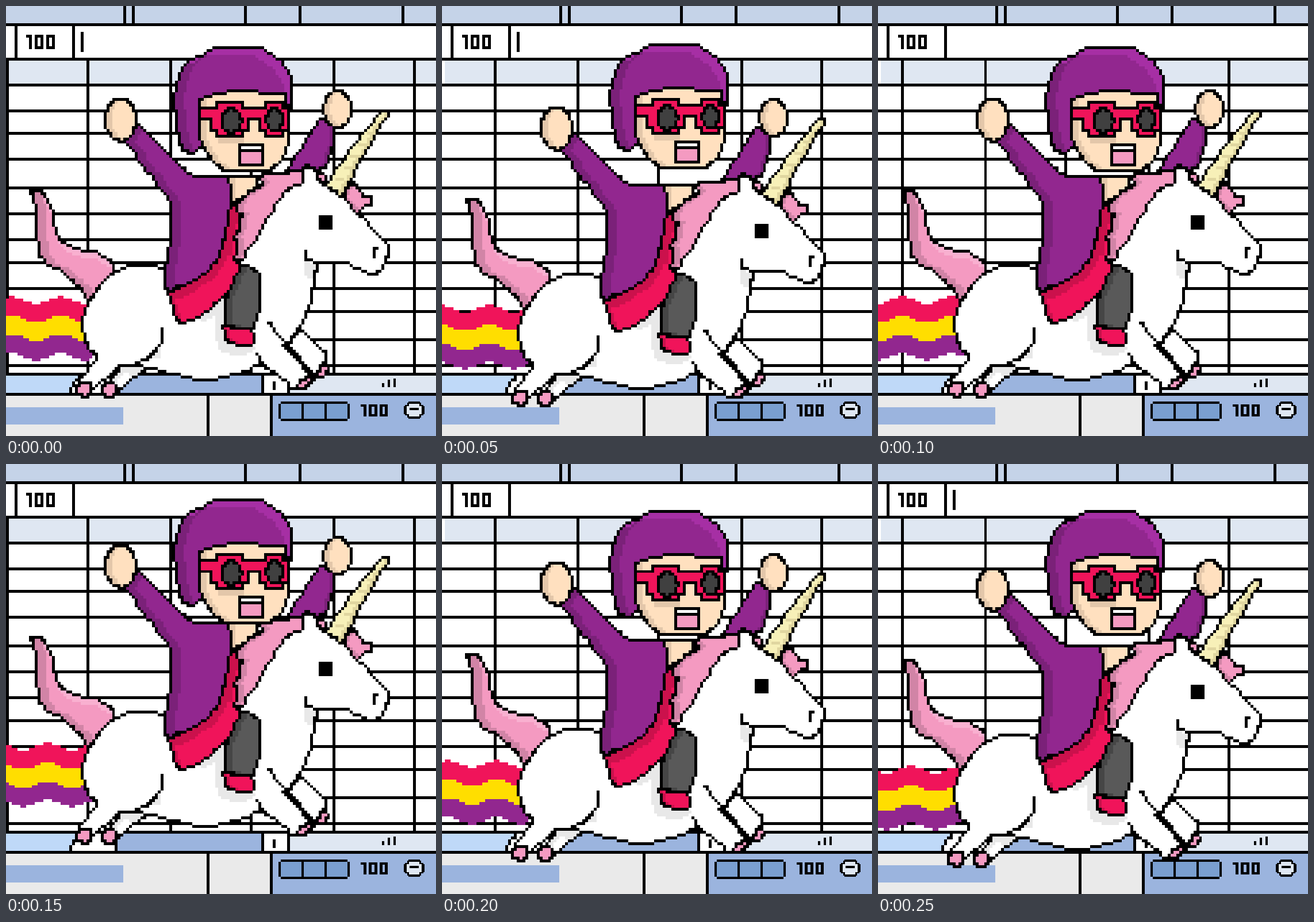
Recreate the animation shown at these times as an HTML page with a canvas. Size 748 by 748 pixels, loop 0.3 s.

```html
<!DOCTYPE html>
<html lang="en">
<head>
<meta charset="utf-8">
<title>Spreadsheet unicorn ride</title>
<style>
html, body { margin: 0; width: 100%; height: 100%; overflow: hidden; background: #fff; }
canvas { display: block; width: 100vw; height: 100vh; image-rendering: pixelated; }
</style>
</head>
<body>
<canvas id="stage" width="748" height="748"></canvas>
<script>
const SIZE = 748, N = 150, CELL = SIZE / N;
const BLACK = '#000', WHITE = '#fff', GREY = '#e8e8e8', COAL = '#404040';
const PURPLE = '#92278f', PLUM = '#7b2179', ORCHID = '#a62fa4';
const RED = '#f0145a', CRIMSON = '#cb114c', YELLOW = '#ffde00';
const PINK = '#f49ac1', ROSE = '#d184a6', BLUSH = '#f9b0d0';
const SKIN = '#ffe0bf', TAN = '#e3c7aa', CREAM = '#f7f0b8', SAND = '#e0d6a0';
const BLUE = '#9bb4de', PALE = '#dfe7f2', ICE = '#bfd9f8', SKY = '#c5d3e8', STEEL = '#7a9fd0';

function layer(size = N) {
  const c = document.createElement('canvas');
  c.width = c.height = size;
  return c.getContext('2d');
}

function box(g, x, y, w, h, color = BLACK) {
  g.fillStyle = color;
  g.fillRect(Math.round(x), Math.round(y), Math.round(w), Math.round(h));
}

// "x,y x,y | x,y ...": each run is smooth, "|" marks a corner
function curve(s) {
  const out = [];
  let last;
  for (const run of s.split(' | ')) {
    const p = run.split(' ').map(q => q.split(',').map(Number));
    if (last) p.unshift(last);
    for (let i = 0; i + 1 < p.length; i++) {
      const a = p[i - 1] || p[i], b = p[i], c = p[i + 1], d = p[i + 2] || c;
      for (let t = 0; t < 1; t += 0.125)
        out.push([0, 1].map(k => b[k] + t / 2 * (c[k] - a[k]
          + t * (2 * a[k] - 5 * b[k] + 4 * c[k] - d[k] + t * (3 * (b[k] - c[k]) + d[k] - a[k])))));
    }
    last = p[p.length - 1];
  }
  out.push(last);
  return out.map(p => p.map(v => Math.floor(v / CELL)));
}

function fillCells(pts) {
  const set = new Set();
  for (let y = 0; y < N; y++) {
    const xs = [];
    pts.forEach(([x1, y1], i) => {
      const [x2, y2] = pts[(i + 1) % pts.length];
      if ((y1 <= y) !== (y2 <= y)) xs.push(x1 + (y - y1) * (x2 - x1) / (y2 - y1));
    });
    xs.sort((a, b) => a - b);
    for (let i = 0; i + 1 < xs.length; i += 2)
      for (let x = Math.ceil(xs[i]); x <= xs[i + 1]; x++) set.add(y * N + x);
  }
  return set;
}

function paint(g, set, color) {
  for (const k of set) box(g, k % N, Math.floor(k / N), 1, 1, color);
}

function stroke(g, pts) {
  for (let i = 1; i < pts.length; i++) {
    const [x1, y1] = pts[i - 1], [x2, y2] = pts[i];
    const n = Math.max(Math.abs(x2 - x1), Math.abs(y2 - y1), 1);
    for (let k = 0; k <= n; k++) box(g, x1 + (x2 - x1) * k / n, y1 + (y2 - y1) * k / n, 1, 1);
  }
}

const line = (g, s) => stroke(g, curve(s));
const patch = (g, s, color) => paint(g, fillCells(curve(s)), color);

// Outlined shape; a shade [color, dx, dy] covers the rim facing (dx, dy)
function shape(g, s, fill, ...shades) {
  const pts = curve(s), base = fillCells(pts);
  paint(g, base, fill);
  for (const [color, dx, dy] of shades)
    paint(g, [...base].filter(k => !base.has(k + dx + dy * N)), color);
  stroke(g, [...pts, pts[0]]);
}

const oval = (cx, cy, rx, ry) => Array.from({ length: 9 }, (_, i) =>
  [cx + rx * Math.cos(i * Math.PI / 4), cy + ry * Math.sin(i * Math.PI / 4)].join()).join(' ');

// Box with corners cut by c
function plate(g, x, y, w, h, c, color) {
  box(g, x + c, y, w - 2 * c, h, color);
  box(g, x, y + c, w, h - 2 * c, color);
}

function hundred(g, x, y, u, v) {
  box(g, x, y, 2 * u, v);
  box(g, x + u, y, u, 5 * v);
  for (const col of [3, 7]) {
    for (const dy of [0, 4]) box(g, x + col * u, y + dy * v, 3 * u, v);
    for (const dx of [0, 2]) box(g, x + (col + dx) * u, y, u, 5 * v);
  }
}

function drawSheet() {
  const g = layer();
  box(g, 0, 0, N, N, WHITE);
  box(g, 0, 0, N, 6, SKY);
  for (const x of [41, 44, 83, 102, 138]) box(g, x, 0, 1, 6);
  for (const x of [3, 23]) box(g, x, 6, 1, 12);
  box(g, 1, 19, N, 8, PALE);

  // tabs, scroll bar, status bar
  box(g, 0, 129, 37, 6, ICE);
  box(g, 37, 129, 52, 6, BLUE);
  box(g, 99, 129, 51, 6, PALE);
  shape(g, '108,674 | 130,642 | 180,642 | 195,674', WHITE);
  for (const x of [89, 98]) box(g, x, 128, 1, 8);
  box(g, 93, 131, 1, 3);
  box(g, 0, 136, 92, 14, '#eaeaea');
  box(g, 93, 136, 57, 14, BLUE);
  box(g, 0, 140, 41, 6, BLUE);
  for (const x of [70, 92]) box(g, x, 136, 1, 14);
  for (const y of [6, 18, 27, 36, 44, 53, 63, 72, 81, 89, 98, 106, 116, 125, 128, 135])
    box(g, 0, y, N, 1);

  // finer icons and digits
  const big = layer(SIZE);
  big.imageSmoothingEnabled = false;
  big.drawImage(g.canvas, 0, 0, SIZE, SIZE);
  hundred(big, 35, 50, CELL, CELL);
  hundred(big, 617, 693, 4.7, 4.2);
  [7, 13, 15].forEach((h, i) => box(big, 654 + 10 * i, 663 - h, 4, h));
  plate(big, 474, 688, 124, 34, 4, BLACK);
  for (let i = 0; i < 3; i++) box(big, 478 + 40 * i, 692, 36, 26, STEEL);
  plate(big, 692, 688, 36, 30, 8, BLACK);
  plate(big, 694, 690, 32, 26, 4, BLACK);
  plate(big, 697, 692, 26, 22, 4, PALE);
  box(big, 702, 699, 16, 4);
  return big.canvas;
}

function drawMount() {
  const g = layer();
  shape(g, '42,320 60,323 80,355 88,398 115,420 160,430 187,448 | 187,462 165,490 142,516 | 128,490 100,465 62,438 54,400 52,352 42,320', PINK,
    [BLUSH, 0, -3], [ROSE, -4, 0]);
  // far arm and legs
  shape(g, '548,196 | 572,212 | 570,237 557,280 | 540,288 | 488,288 | 518,240', PURPLE, [PLUM, 2, 0]);
  shape(g, oval(577, 180, 25, 32), SKIN, [TAN, -3, 0]);
  shape(g, '490,590 | 512,562 | 555,603 | 557,622 | 540,645 | 533,643', WHITE);
  shape(g, '250,625 | 197,668 | 172,658 | 212,620', WHITE, [GREY, 0, -4]);
  // body, neck, head and near legs
  shape(g, '143,517 160,490 187,464 232,449 278,456 | 340,470 | 405,446 | 435,406 456,365 490,320 514,308 | 513,298 518,281 527,279 539,287 540,300 | 585,331 | 664,416 | 664,432 655,456 636,466 594,447 | 540,447 | 537,472 525,526 507,562 490,590 | 533,643 | 506,668 | 442,622 | 400,641 340,650 290,640 235,626 | 207,625 185,638 150,666 | 125,655 | 159,611 | 140,588 133,552 143,517', WHITE);
  patch(g, '520,445 | 537,452 | 530,475 | 517,470', GREY);
  patch(g, '340,530 | 385,500 | 385,585 | 432,595 | 410,613 | 370,600 | 366,540 | 342,550', GREY);
  patch(g, '268,592 | 268,612 | 235,620', GREY);
  line(g, '522,425 | 522,440 | 540,447');
  line(g, '272,560 268,590 247,612 228,621');
  for (const g0 of ['457,550 | 487,590 | 530,640', '483,590 | 525,640', '437,605 | 455,633']) line(g, g0);
  // hooves
  for (const [x, y] of [[136, 667], [181, 668]]) shape(g, oval(x, y, 14, 12), PINK);
  shape(g, '505,664 | 513,652 | 526,645 | 534,650 | 515,668', PINK);
  shape(g, '540,644 | 546,628 | 555,622 | 561,632 | 550,647', PINK);
  // eye and nostril
  box(g, 109, 73, 5, 5);
  line(g, '645,420 | 641,427 | 641,437');
  // forelock and horn
  shape(g, '540,285 | 558,298 | 552,312 | 542,302', PINK);
  shape(g, '588,332 | 603,305 | 620,329 | 637,331 | 637,345 | 622,350 | 612,360', PINK, [ROSE, -2, 0]);
  shape(g, '656,180 | 667,180 | 667,186 | 627,250 | 584,331 | 555,311 | 600,248', CREAM, [SAND, 2, 0]);
  for (let k = 0; k < 5; k++) box(g, 115 + 2.7 * k, 60 - 4 * k, 3, 1, SAND);

  // rider
  shape(g, '388,297 | 437,297 | 437,312 | 410,335 | 390,345', SKIN, [TAN, -2, 0]);
  shape(g, '390,338 | 411,365 | 402,420 | 399,442 | 418,456 | 400,482 342,535 312,550 | 296,548 | 283,498 | 350,460 | 375,420', RED,
    [CRIMSON, -3, -3]);
  shape(g, '326,297 | 388,297 | 391,340 383,385 373,428 350,460 285,495 | 279,490 | 279,450 284,420 287,340 | 240,280 | 209,236 | 229,203 | 275,250 303,278 326,297', PURPLE,
    [PLUM, -4, 0]);
  shape(g, oval(200, 198, 28, 37), SKIN, [TAN, -3, 0]);
  shape(g, '437,297 460,292 514,288 | 514,308 490,320 456,365 435,406 405,446 | 398,438 403,420 398,402 408,386 | 404,375 | 411,365 | 401,352 410,335 | 437,317 | 445,309', PINK,
    [ROSE, -3, 0]);
  shape(g, '412,450 | 430,457 442,472 442,520 428,562 | 382,556 | 380,525 390,490 412,450', '#595959', ['#464646', -3, 0]);
  shape(g, '378,556 400,561 420,562 433,574 430,588 410,590 385,582 378,556', RED, [CRIMSON, -2, 0]);
  return g.canvas;
}

function drawHead() {
  const g = layer();
  shape(g, '360,73 437,73 480,97 497,130 | 497,175 | 488,172 | 345,240 | 330,254 316,254 303,241 297,200 294,150 312,103 360,73', PURPLE,
    [PLUM, -4, 0], [ORCHID, 3, -3]);
  shape(g, '338,162 365,153 400,148 430,148 452,153 | 488,153 | 488,248 463,283 | 455,287 | 380,287 | 356,264 338,232', SKIN,
    [TAN, -3, 0]);
  box(g, 74, 45, 9, 3, TAN);
  // glasses
  plate(g, 68, 35, 31, 5, 0, BLACK);
  for (const [x, w] of [[71, 14], [88, 11]]) {
    plate(g, x, 33, w, 13, 2, BLACK);
    plate(g, x + 1, 34, w - 2, 11, 2, RED);
  }
  box(g, 68, 36, 30, 3, RED);
  shape(g, oval(392, 200, 18, 21), COAL);
  shape(g, oval(467, 198, 14, 20), COAL);
  // mouth
  box(g, 81, 48, 9, 8);
  box(g, 82, 49, 7, 1, WHITE);
  box(g, 82, 51, 7, 4, PINK);
  return g.canvas;
}

// Bounce and wave position per 50 ms step, in cells
const STEP = 50, STEPS = 6;
const mountY = [0, 3, 0, -4, 2, 4];
const headY = [0, -1, 0, -2, 2, 2];
const crest = [18.5, 16, 8, 14, 18.5, 11];

const sheet = drawSheet(), mount = drawMount(), head = drawHead(), scene = layer();
const stage = document.getElementById('stage').getContext('2d');
stage.imageSmoothingEnabled = false;

function drawRainbow(i) {
  for (let x = 0; x < 30; x++) {
    const y = 102.6 + mountY[i] - 1.2 * Math.cos((x - crest[i]) * 2 * Math.PI / 17);
    [RED, YELLOW, PURPLE].forEach((color, k) => {
      const top = Math.round(y + 6.6 * k);
      box(scene, x, top, 1, Math.round(y + 6.6 * (k + 1)) - top, color);
    });
  }
}

function draw(i) {
  scene.clearRect(0, 0, N, N);
  for (let c = 0; c < 6; c++) box(scene, Math.round(28.4 * c) - i % 3 * 10, 18, 1, 111);
  if ((i + 1) % STEPS < 3) box(scene, 26, 9, 1, 7);
  drawRainbow(i);
  scene.drawImage(mount, 0, mountY[i]);
  scene.drawImage(head, 0, headY[i]);
  stage.drawImage(sheet, 0, 0);
  stage.drawImage(scene.canvas, 0, 0, SIZE, SIZE);
}

const start = performance.now();
function tick() {
  draw(Math.floor((performance.now() - start) / STEP) % STEPS);
  requestAnimationFrame(tick);
}
tick();
</script>
</body>
</html>
```
